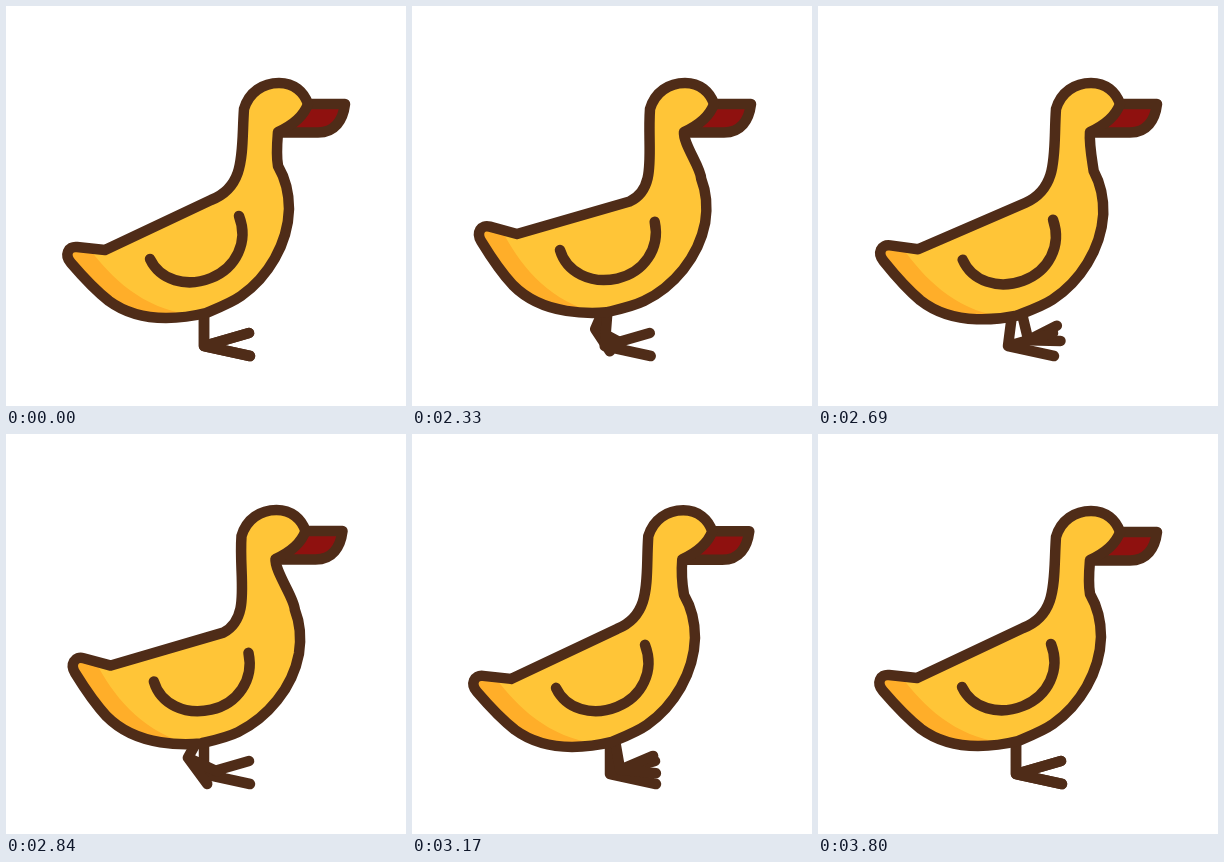
Write an HTML page with a canvas that moves like this. It is 400 by 400 pixels and loops after 3.83 s.

```html
<!DOCTYPE html>
<html lang="en">
<head>
<meta charset="utf-8">
<title>Duck</title>
<style>
html, body { margin: 0; width: 100%; height: 100%; overflow: hidden; background: #fff; }
canvas { display: block; width: 400px; height: 400px; }
</style>
</head>
<body>
<canvas id="stage" width="400" height="400"></canvas>
<script>
const ctx = document.getElementById('stage').getContext('2d');
const { PI, sin, cos, abs, min, max } = Math;
const LOOP = 3830, REST = 2030, STEP = 30;
const BROWN = '#4f2c18', YELLOW = '#ffc537', ORANGE = '#ffae29', RED = '#8f110f';
const STRIDE = 18.7;

const clamp = v => min(1, max(0, v));
const lerp = (a, b, u) => a + (b - a) * u;
// Smooth hill of height 1 around a centre
const bump = (k, centre, width) =>
  abs(k - centre) < width ? cos(PI / 2 * (k - centre) / width) ** 2 : 0;

function turn(x, y, cx, cy, deg, dx, dy) {
  const a = deg * PI / 180, c = cos(a), s = sin(a);
  x -= cx;
  y -= cy;
  return [cx + x * c - y * s + dx, cy + x * s + y * c + dy];
}

// The body rocks once per stride, then the duck bows and springs back
function pose(k) {
  const walking = k > 0 && k < 2 * STRIDE;
  const rock = walking ? abs(sin(PI * k / STRIDE)) ** 2.5 : 0;
  const lean = 1.1 * bump(k, 46, 8) - .25 * bump(k, 55, 4);
  const back = bump(k, 32, 10);
  const sink = 3.2 * bump(k, 27, 17);
  const nod = k < 0 ? 0 : 2 * bump(k, 0, 8);

  const body = (x, y) => {
    const chest = lean * clamp((x - 236) / 36) * clamp((290 - y) / 130);
    return turn(x + 12 * chest, y + 6 * chest, 200, 250, 9.3 * rock, 3.8 * rock, sink);
  };
  const head = (x, y) => turn(x, y, 273, 110, 4.5 * lean,
    15 * lean - 5 * back - nod, 8 * lean - 2 * back - nod / 4);
  return { body, head, sink };
}

// u runs from 0 to 1 while the foot is off the ground
function swing(u, from) {
  const wave = sin(2 * PI * u ** 1.5);
  return {
    x: lerp(from, 198, u) - 13 * wave,
    y: 340 - 17 * sin(PI * u ** .7),
    angle: 72 * (1 - u) * wave,
    size: 1 - .55 * sin(PI * u ** 1.3)
  };
}

function foot(k, lift, land) {
  const slide = k => 195 - 5 * k / 22;
  if (k >= lift && k < land) return swing((k - lift) / (land - lift), slide(lift));
  const x = k < 0 || k >= land ? 198 : slide(k);
  return { x, y: 340, angle: 0, size: 1 };
}

function drawLeg({ x, y, angle, size }, hipY) {
  const toe = (dx, dy) => turn(dx * size, dy * size, 0, 0, angle, x, y);
  ctx.beginPath();
  ctx.moveTo(lerp(198, x, .5), hipY);
  ctx.lineTo(x, y);
  ctx.lineTo(...toe(45, -13));
  ctx.moveTo(x, y);
  ctx.lineTo(...toe(46, 10));
  ctx.stroke();
}

function paint(path, fill) {
  ctx.fillStyle = fill;
  ctx.fill(path);
}

function draw(k) {
  const { body, head, sink } = pose(k);
  const curve = (path, a, b, c) => path.bezierCurveTo(...a, ...b, ...c);

  ctx.fillStyle = '#fff';
  ctx.fillRect(0, 0, 400, 400);
  ctx.lineWidth = 10.5;
  ctx.lineCap = ctx.lineJoin = 'round';
  ctx.strokeStyle = BROWN;

  drawLeg(foot(k, 0, 26), 306 + sink);
  drawLeg(foot(k, 22, 40), 306 + sink);

  const beak = new Path2D();
  beak.moveTo(...head(302, 98));
  beak.lineTo(...head(339, 98));
  curve(beak, head(337, 114), head(329, 126.5), head(312, 126.5));
  beak.lineTo(...head(272, 126.5));
  paint(beak, RED);
  ctx.stroke(beak);

  const shape = new Path2D();
  const [nx, ny] = body(241, 180);
  shape.moveTo(...body(99, 244));
  shape.lineTo(...body(205, 194));
  curve(shape, [lerp(241, nx, .35), lerp(180, ny, .35)], head(235, 145), head(238, 103));
  curve(shape, head(243, 86), head(257, 77), head(273, 77));
  curve(shape, head(288, 77), head(298, 86), head(302, 98));
  curve(shape, head(297, 112), head(285, 120), head(272, 126));
  curve(shape, head(271, 138), body(270, 149), body(272, 160));
  curve(shape, body(279, 172), body(283, 188), body(283, 203));
  curve(shape, body(282, 238), body(262, 271), body(235, 290));
  curve(shape, body(225, 297), body(212, 302), body(200, 307));
  curve(shape, body(188, 310), body(174, 312), body(160, 312));
  curve(shape, body(138, 312), body(118, 306), body(103, 295));
  curve(shape, body(89, 284), body(77, 271), body(65, 257));
  curve(shape, body(58, 249), body(62, 240), body(71, 241));
  shape.closePath();
  paint(shape, YELLOW);

  const shade = new Path2D();
  shade.moveTo(...body(80, 238));
  curve(shade, body(100, 266), body(130, 298), body(175, 307));
  shade.lineTo(...body(100, 330));
  shade.lineTo(...body(40, 255));
  ctx.save();
  ctx.clip(shape);
  paint(shade, ORANGE);
  ctx.restore();
  ctx.stroke(shape);

  const wing = new Path2D();
  wing.moveTo(...body(144, 253));
  curve(wing, body(154, 274), body(180, 282), body(205, 272));
  curve(wing, body(230, 262), body(243, 236), body(233, 210));
  ctx.stroke(wing);
}

const start = performance.now();
function frame() {
  const t = max(0, performance.now() - start) % LOOP;
  draw(t < REST ? -1 : Math.floor((t - REST) / STEP));
  requestAnimationFrame(frame);
}
frame();
</script>
</body>
</html>
```
